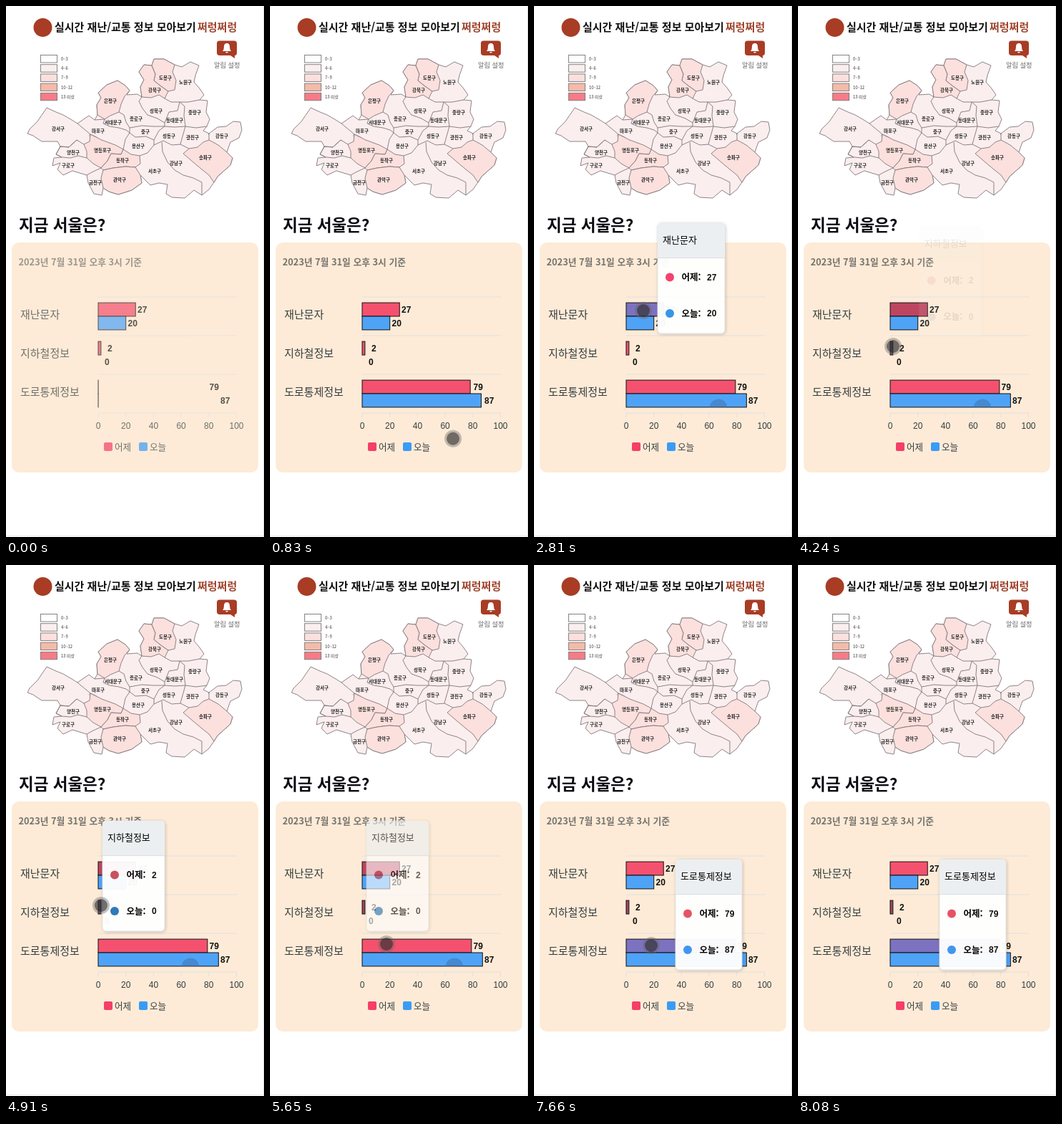
An HTML page that plays this animation: 361x741 px, repeating every 8.54 s.

```html
<!DOCTYPE html>
<html lang="ko">
<head>
<meta charset="utf-8">
<title>실시간 재난/교통 정보</title>
<style>
  html, body { margin: 0; width: 100%; height: 100%; overflow: hidden; background: #fff; }
  svg { display: block; width: 361px; height: 741px; }
  text { font-family: "Noto Sans CJK KR", "Noto Sans CJK", sans-serif; }
  .num, .axis { font: 12px "Liberation Sans", sans-serif; }
  .num { font-weight: 700; fill: #111; }
  .axis { fill: #373d3f; text-anchor: middle; }
  .land { fill: #fbeeee; }
  .warm { fill: #fbe0de; }
  .map path { stroke: #80767a; stroke-width: .9; stroke-linejoin: round; }
  .map .fill { stroke: none; }
  .gu { font-size: 6.5px; font-weight: 600; fill: #222; text-anchor: middle; }
  .key rect { stroke: #777; stroke-width: .9; }
  .key text { font-size: 5.8px; fill: #333; }
  .bar { stroke: #111; stroke-width: 1; }
  .cat { font-size: 15px; font-weight: 500; fill: #373d3f; }
  .tip { filter: drop-shadow(1px 1px 2px rgba(0,0,0,.18)); }
  .tip .head { font-size: 13px; font-weight: 500; }
  .tip .label { font-size: 12.5px; font-weight: 600; }
</style>
</head>
<body>
<svg viewBox="0 0 361 741">
  <path d="M360.5 0V741M0 739.5H361" stroke="#e6e6e6"/>

  <circle cx="51.5" cy="30" r="13" fill="#a83c25"/>
  <g font-size="15" font-weight="700">
    <text x="68" y="35" fill="#111">실시간 재난/교통 정보 모아보기</text>
    <text x="268" y="35" fill="#a0452f">쩌렁쩌렁</text>
  </g>

  <path d="M299 48.5H319Q323 48.5 323 52V65Q323 69 320 69L320 73 314 69H299Q295 69 295 65V52Q295 48.5 299 48.5Z" fill="#a83c25"/>
  <path d="M303 63Q305 61 305 57Q305 52 309 52Q313 52 313 57Q313 61 315 63ZM307 64H311Q309 67 307 64Z" fill="#fff"/>
  <text x="291" y="86" font-size="9.2" fill="#666">알림 설정</text>

  <g id="key" class="key"></g>

  <g class="map">
    <path class="land" d="M30 178L33 172 44 161 57 142 70 148 80 152 92 159 100 164 116 153 124 159 128 152 127 138 133 128 129 121 141 110 156 104 167 111 173 118 169 124 184 123 190 127 188 113 193 103 186 92 193 82 204 83 207 74 221 74 236 82 246 85 258 78 270 83 265 97 263 106 270 114 277 124 271 131 282 132 280 148 285 158 281 168 276 174 284 178 280 200 200 220 120 215 76 196 72 189 50 189 38 181Z"/>
    <path class="land" d="M284 178L296 169 308 168 318 161 328 162 330 173 326 184 314 190 309 204 317 212 314 222 305 230 296 238 291 246 284 256 274 264 263 257 250 268 232 267 224 262 226 249 214 247 202 250 188 236 190 247 176 257 157 263 144 259 136 254 134 264 123 262 115 247 113 236 103 233 93 230 80 236 72 228 76 219 65 223 67 212 78 211 70 207 76 196 88 197 99 187 109 193 118 179 164 200 187 209 207 194 244 193 256 199 276 190Z"/>
    <path class="land fill" d="M77 197L88 198 99 188 118 181 164 190 210 180 250 180 275 176 283 179 283 186 270 205 230 215 190 215 120 220 80 211 72 207Z"/>
    <g class="warm">
      <path d="M128 152L127 138 133 128 129 121 141 110 156 104 167 111 173 118 166 126 161 137 158 148 146 153 138 158Z"/>
      <path d="M190 127L188 113 193 103 186 92 193 82 204 83 209 95 207 104 217 112 227 119 222 129 214 124 203 128Z"/>
      <path d="M204 83L207 74 221 74 236 82 233 92 238 104 236 117 227 119 217 112 207 104 209 95Z"/>
      <path d="M118 179L134 187 153 194 164 200 161 207 147 206 142 216 133 226 122 220 113 212 113 203 109 193 117 189Z"/>
      <path d="M164 200L175 207 187 209 188 220 181 225 167 224 150 226 136 229 133 226 142 216 147 206 161 207Z"/>
      <path d="M136 229L150 226 167 224 181 225 188 236 190 247 176 257 157 263 144 259 136 254 133 240Z"/>
      <path d="M256 199L268 197 276 190 284 187 297 194 309 204 317 212 314 222 305 230 296 238 291 246 284 236 274 228 262 218 248 206Z"/>
    </g>
    <g fill="none">
      <path d="M100 164L118 179M76 196L88 197 99 187 109 193M76 196L70 207 78 211 90 212 101 209 113 212M133 226L120 232 113 236"/>
      <path d="M124 159L138 158 136 164 145 168 158 170 168 173 173 177 167 186 164 200M158 148L165 152 168 162 173 170 173 177"/>
      <path d="M190 127L186 133 191 143 198 152 212 157 222 163M173 170L190 167 206 168 222 168M173 177L181 183 196 182 207 187M222 168L214 174 207 187"/>
      <path d="M187 209L198 205 207 194 207 187M222 129L231 134 243 134 255 134 271 131M243 134L240 146 228 148 222 163"/>
      <path d="M243 134L250 140 249 153 251 168M222 163L222 168 236 169 251 168 266 170 281 168M251 168L247 182 244 193"/>
      <path d="M207 194L220 188 232 194 244 193 256 199M284 178L284 187M218 190L219 203 226 218 236 229 248 236 262 240 274 246 274 264"/>
    </g>
  </g>
  <g id="names"></g>

  <text x="18" y="314" font-size="22.5" font-weight="700" fill="#0c0c14">지금 서울은?</text>
  <rect x="8" y="330" width="345" height="321" rx="10" fill="#fdebd7"/>

  <g id="chart">
    <text x="17.5" y="362" font-size="12.8" font-weight="700" fill="#77736e">2023년 7월 31일 오후 3시 기준</text>
    <path id="grid" stroke="#e0e0e0" fill="none"/>
    <g id="rows"></g>
    <path id="trace" d="M246 559.5A12 11 0 0 1 270 559.5Z" fill="#3f78b8" opacity=".6"/>
    <g font-size="12.6" fill="#373d3f">
      <rect x="137" y="609" width="12" height="12" rx="2" fill="#f43f66"/>
      <text x="152" y="620">어제</text>
      <rect x="186" y="609" width="12" height="12" rx="2" fill="#3a9bf5"/>
      <text x="201" y="620">오늘</text>
    </g>
  </g>

  <g id="tips"></g>
  <g id="cursor">
    <circle r="12" fill="#666" opacity=".4"/>
    <circle r="9" fill="#1e1e1e" opacity=".5"/>
  </g>
</svg>
<script>
const LOOP = 8540, X0 = 129, UNIT = 1.935, BAR = 18.9;
const PINK = '#f4516f', BLUE = '#4fa3f7', TINT = '#7d72bf';
const $ = id => document.getElementById(id);
const text = (cls, x, y, s) => `<text class="${cls}" x="${x}" y="${y}">${s}</text>`;

// Map key and district names
const levels = [['#fff', '0~3'], ['#fbeeee', '4~6'], ['#fbe0de', '7~9'], ['#f3bba9', '10~12'], ['#f77b87', '13 이상']];
$('key').innerHTML = levels.map(([color, s], i) => {
  const y = 68.5 + i * 13.2;
  return `<rect x="48.5" y="${y}" width="23" height="10.5" fill="${color}"/>` + text('', 77, y + 7.5, s);
}).join('');

const places = `도봉 223 100,노원 251 106,강북 208 117,은평 146 132,성북 210 146,중랑 264 148,종로 182 157,
서대문 150 162,동대문 236 159,강서 73 171,마포 129 174,중 195 175,성동 228 181,광진 261 183,강동 302 181,
용산 185 195,양천 94 204,영등포 135 201,동작 163 215,송파 279 211,강남 238 219,구로 87 222,서초 208 230,
금천 125 246,관악 159 242`;
$('names').innerHTML = places.split(',').map(p => {
  const [name, x, y] = p.trim().split(' ');
  return text('gu', x, +y + 2.5, name + '구');
}).join('');

// Chart: each row has yesterday's and today's value with their label positions
const rows = [
  { name: '재난문자', vals: [27, 20], at: [184, 170.5] },
  { name: '지하철정보', vals: [2, 0], at: [142, 138] },
  { name: '도로통제정보', vals: [79, 87], at: [284.5, 300] }
];
let grid = [406, 460, 514, 568].map(y => `M${X0} ${y}H323`).join('');
let html = '';
for (let v = 0; v <= 100; v += 20) {
  const x = X0 + v * UNIT;
  grid += `M${x} 568V574`;
  html += text('axis', x, 590, v);
}
$('grid').setAttribute('d', grid);
rows.forEach((row, i) => {
  const top = 414.1 + i * 54;
  html += text('cat', 20, 435.7 + i * 54, row.name);
  row.vals.forEach((v, j) => {
    const y = top + j * BAR;
    if (v) html += `<rect id="bar${i}${j}" class="bar" x="${X0}" y="${y}" width="${v * UNIT}" height="${BAR}" fill="${j ? BLUE : PINK}"/>`;
    html += text('num', row.at[j], y + 13.7, v);
  });
});
$('rows').innerHTML = html;

// Tooltips slide from one place to the next while fading in
const tips = [
  { w: 94, from: [150, 327], to: [173, 303], on: 2290, off: 4000, dots: ['#f4426c', '#3596e8'] },
  { w: 87, from: [173, 303], to: [135, 357], on: 4213, off: 5590, dots: ['#c8525f', '#2f7ab8'] },
  { w: 93, from: [135, 357], to: [198, 411], on: 5765, off: LOOP, dots: ['#e65365', '#4096ee'] }
];
$('tips').innerHTML = tips.map(({ w, dots }, i) => {
  const line = (label, j) => {
    const y = 75.5 + j * 50.5;
    return `<circle cx="17" cy="${y}" r="6" fill="${dots[j]}"/>` +
      text('label', 33.5, y + 4.5, label) + text('num', 69, y + 4.2, rows[i].vals[j]);
  };
  return `<g class="tip" id="tip${i}">
    <rect width="${w}" height="154" rx="5" fill="#fff" fill-opacity=".96" stroke="#e3e3e3"/>
    <path d="M0 48V5Q0 0 5 0H${w - 5}Q${w} 0 ${w} 5V48Z" fill="#eceff1"/>
    <path d="M0 48.5H${w}" stroke="#dddfe1"/>
    ${text('head', 7, 28, rows[i].name)}${line('어제:', 0)}${line('오늘:', 1)}</g>`;
}).join('');

// Pointer path: time, x, y
const path = [
  [560, 268, 755], [740, 255, 660], [900, 257, 560], [970, 257, 560], [1310, 160, 415], [1510, 160, 415],
  [1580, 157, 418], [1839, 157, 418], [1840, 154, 420], [2740, 154, 421], [2810, 153, 425], [3090, 149, 452],
  [3620, 149, 452], [3830, 133, 475], [4910, 133, 475], [5190, 163, 527], [5450, 163, 527], [5460, 163, 529],
  [7600, 163, 529], [7660, 164, 531], [7800, 215, 590], [7940, 262, 665], [8030, 302, 716], [8080, 320, 756]
];

const mix = (a, b, p) => a + (b - a) * p;
const ramp = (t, start, len) => Math.min(1, Math.max(0, (t - start) / len));
const smooth = p => p * p * (3 - 2 * p);

function pointAt(t) {
  const n = path.findIndex(p => p[0] > t);
  if (n < 1) return [-50, -50];
  const a = path[n - 1], b = path[n], p = (t - a[0]) / (b[0] - a[0]);
  return [mix(a[1], b[1], p), mix(a[2], b[2], p)];
}

// Last colour whose time has come
const step = (t, list) => list.filter(s => s[0] <= t).pop()[1];

function draw(t) {
  $('chart').setAttribute('opacity', mix(.7, 1, ramp(t, 70, 410)));
  const grow = smooth(ramp(t, 70, 810));
  rows[2].vals.forEach((v, j) => $('bar2' + j).setAttribute('width', Math.max(.1, v * UNIT * grow)));

  $('bar00').setAttribute('fill', step(t, [[0, PINK], [2290, TINT], [4100, '#be4560'], [5765, PINK]]));
  $('bar10').setAttribute('fill', step(t, [[0, PINK], [4213, '#6a4470'], [5600, '#a04560']]));
  $('bar20').setAttribute('fill', step(t, [[0, PINK], [5765, TINT]]));
  $('trace').setAttribute('visibility', t >= 970 && t < 5900 ? 'visible' : 'hidden');

  tips.forEach(({ from, to, on, off }, i) => {
    const p = smooth(ramp(t, on, 150));
    const el = $('tip' + i);
    el.setAttribute('transform', `translate(${mix(from[0], to[0], p)} ${mix(from[1], to[1], p)})`);
    el.setAttribute('opacity', p * (1 - smooth(ramp(t, off, 150))));
  });
  $('cursor').setAttribute('transform', `translate(${pointAt(t)})`);
}

let start;
function tick(now) {
  start ??= now;
  draw(Math.max(0, now - start) % LOOP);
  requestAnimationFrame(tick);
}
draw(0);
requestAnimationFrame(tick);
</script>
</body>
</html>
```
